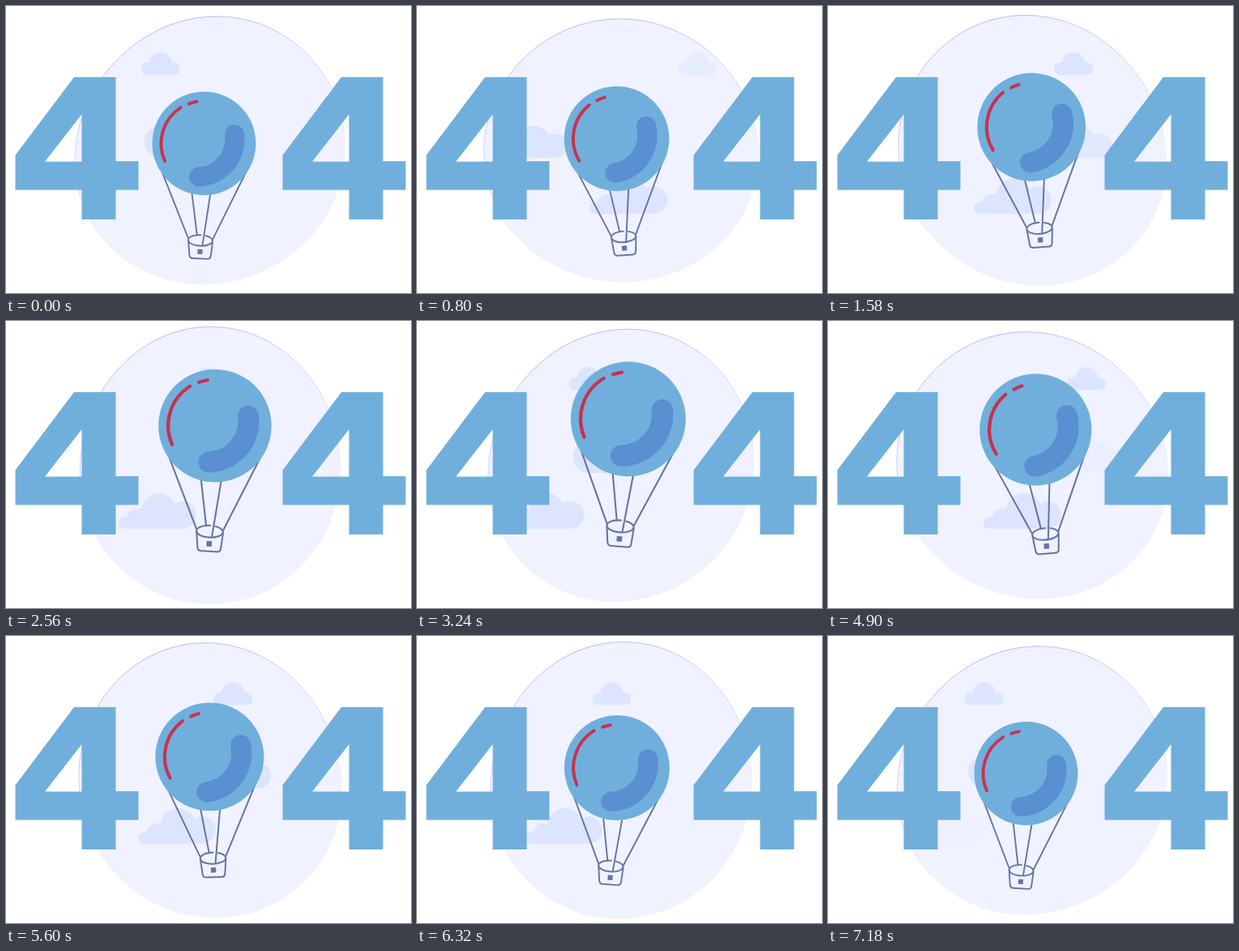
An HTML page for the animation above (7200 ms loop, 500 by 355 pixels).

```html
<!DOCTYPE html>
<html lang="en">
<head>
<meta charset="utf-8">
<title>404</title>
<style>
  html, body { margin: 0; width: 100%; height: 100%; overflow: hidden; background: #fff; }
  svg { display: block; width: 500px; height: 355px; }
  .cloud { fill: #dce5fd; }
  .digit { fill: #70afdc; fill-rule: evenodd; }
  .line { fill: none; stroke: #6474a6; stroke-width: 1.9; stroke-linecap: round; stroke-linejoin: round; }
  .shine { fill: none; stroke: #c83250; stroke-width: 3.9; stroke-linecap: round; }
  .shade { fill: none; stroke: #5a8fd1; stroke-width: 24; stroke-linecap: round; }
</style>
</head>
<body>
<svg viewBox="0 0 500 355" role="img" aria-label="404">
  <linearGradient id="rim" x2=".4" y2="1">
    <stop offset="0" stop-color="#9a94ff"/>
    <stop offset=".8" stop-color="#f0f2ff"/>
  </linearGradient>
  <path id="blob" fill="#f0f2ff" stroke="url(#rim)" stroke-width=".8"/>

  <g class="cloud" id="small">
    <circle cx="0" cy="71" r="14"/>
    <rect x="-24" y="69.5" width="48" height="16" rx="8"/>
  </g>
  <g class="cloud" id="middle">
    <circle cx="0" cy="168" r="20"/>
    <rect x="0" y="158" width="41" height="30" rx="14"/>
    <rect x="0" y="170" width="24" height="18"/>
  </g>
  <g class="cloud" id="large">
    <circle cx="50" cy="235" r="22"/>
    <circle cx="23" cy="244.5" r="12.5"/>
    <circle cx="79" cy="240" r="17"/>
    <rect x="0" y="243" width="60" height="14" rx="7"/>
    <rect x="20" y="240" width="59" height="17"/>
  </g>

  <g id="balloon">
    <g class="line">
      <path d="M-54 29L-14.5 117.5M56 27L16 118M-12.6 60L-3.6 113.5M10.8 60L3.6 126"/>
      <path d="M7 113.9A15 6.7 0 1 1 1 113.3"/>
      <path d="M-14 121L-12 138Q-11.5 142.5 -8 142.5H11Q14 142.5 14.5 139L16 121"/>
    </g>
    <rect x="-2" y="131" width="6" height="6" fill="#6474a6"/>
    <circle r="64" fill="#70afdc"/>
    <path class="shade" d="M37 -13A46.5 46.5 0 0 1 -4.5 41.5"/>
    <path class="shine" id="shine"/>
  </g>

  <path class="digit" id="four" d="M84 88H135.5V192H163.5V227.5H135.5V264H93.5V227.5H11.5V184.5ZM93.5 134V192.5H48Z"/>
  <use href="#four" x="330"/>
</svg>
<script>
const LOOP = 7200;
const CLOUD_TIME = 3608;
const SWING_TIME = 3640;
const TURN = 2 * Math.PI;
const { sin, cos, min } = Math;
const $ = id => document.getElementById(id);
const polar = (r, a) => [r * cos(a), r * sin(a)];

const CLOUDS = [
  { el: $('small'), start: 500, from: 363, travel: 200 },
  { el: $('middle'), start: 1150, from: 335.5, travel: 212 },
  { el: $('large'), start: 0, from: 246, travel: 151 }
];

function arc(r, from, to) {
  const at = deg => polar(r, deg * TURN / 360);
  return `M${at(from)}A${r} ${r} 0 0 1 ${at(to)}`;
}

// A slightly lopsided circle with an oval bulge travelling around it
function drawBlob(t) {
  const phase = TURN * t / (LOOP / 2) + .35;
  const pts = [];
  for (let i = 0; i < 90; i++) {
    const a = TURN * i / 90;
    const r = 166 - cos(2 * a) + sin(3 * a) + 4.5 * sin(phase - 2 * a);
    const [x, y] = polar(r, a);
    pts.push([252 + x, 179.5 + y]);
  }
  $('blob').setAttribute('d', `M${pts.join('L')}Z`);
}

function drawCloud({ el, start, from, travel }, t) {
  const p = ((t - start + CLOUD_TIME) % CLOUD_TIME) / CLOUD_TIME;
  el.setAttribute('transform', `translate(${from - travel * p} 0)`);
  el.setAttribute('opacity', min(1, p / .17, (1 - p) / .1));
}

function drawBalloon(t) {
  const p = (1 - cos(TURN * t / LOOP)) / 2;
  const tilt = -4.9 * sin(TURN * (t - 320) / SWING_TIME);
  $('balloon').setAttribute('transform',
    `translate(${244.5 + 16.7 * p} ${170 - 50 * p}) rotate(${tilt}) scale(${1 + .112 * p})`);
}

function draw(t) {
  drawBlob(t);
  CLOUDS.forEach(c => drawCloud(c, t));
  drawBalloon(t);
}

$('shine').setAttribute('d', arc(53, 153, 234.5) + arc(52.5, 246.6, 257.5));

const begin = performance.now();
function tick() {
  draw((performance.now() - begin) % LOOP);
  requestAnimationFrame(tick);
}
tick();
</script>
</body>
</html>
```
